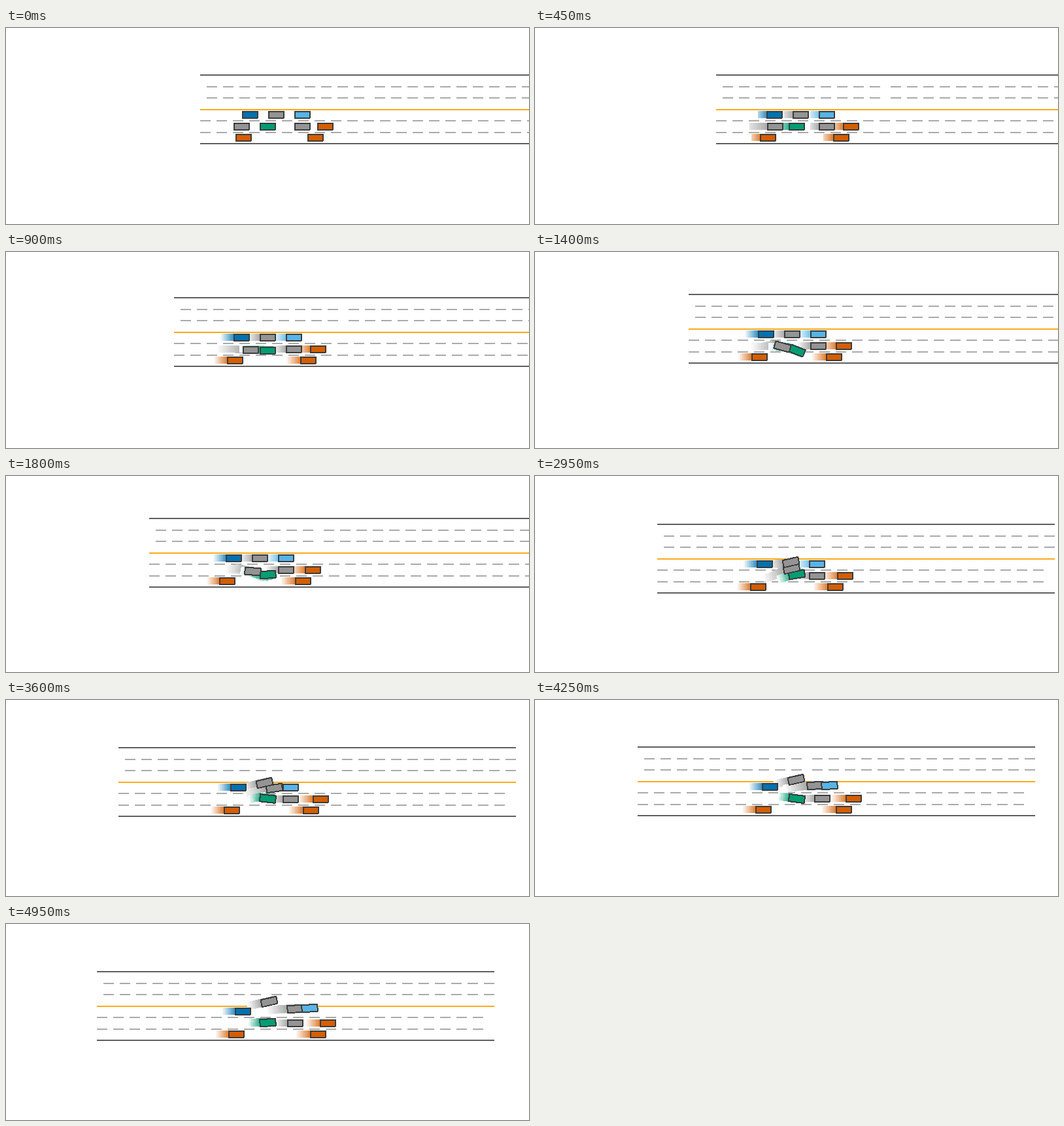
These frames come from a looping animation (800x300 px, 5 s). A matplotlib script:

```python
import numpy as np
import matplotlib.pyplot as plt
from matplotlib.animation import FuncAnimation
from matplotlib.collections import PolyCollection
from matplotlib.colors import to_rgb

W, H, DPI = 800, 300, 100
FRAMES, STEP_MS = 100, 50
EGO_X, EGO_Y = 400.5, 151
ROAD_LEN = 608
TRAIL, TRAIL_STRENGTH = 14, .82

BLUE, SKY, GREEN, ORANGE, GREY = "#0072b2", "#56b4e9", "#009e73", "#d55e00", "#949494"
OUTLINE, EDGE, DASH, MEDIAN = "#3c3c3c", "#5f5f5f", "#aaaaaa", "#fdaa1a"


def curve(*keys):
    """Smooth cubic path through a few (seconds, value) points."""
    times, values = np.array(keys, float).T
    slopes = np.gradient(values, times)

    def at(t):
        t = np.clip(t, times[0], times[-1])
        i = min(np.searchsorted(times, t, side="right"), len(times) - 1)
        span = times[i] - times[i - 1]
        u = (t - times[i - 1]) / span
        ease = u * u * (3 - 2 * u)
        bend = u * (1 - u) * ((1 - u) * slopes[i - 1] - u * slopes[i])
        return values[i - 1] + ease * (values[i] - values[i - 1]) + span * bend
    return at


def cruise(start, speed):
    return lambda t: start + speed * t


def after(t, start):
    return max(0, t - start)


def ramp(t, start, end):
    u = np.clip((t - start) / (end - start), 0, 1)
    return u * u * (3 - 2 * u)


def swerve(t):
    """Heading of the car that is hit: a damped swing around straight ahead."""
    s = t - 1.75
    return -27 * ramp(t, .9, 1.4) * np.exp(-.5 * s) * np.sin(2.05 * s)


# Screen position of the road; the camera follows the green car.
road_x = curve((0, 297), (.9, 257), (1.4, 235), (2.25, 204), (2.95, 187),
               (4.25, 157), (4.95, 139))
road_y = curve((0, 71), (.9, 69), (1.4, 64), (1.6, 63), (2.25, 69), (2.95, 73),
               (4.25, 71), (4.95, 72))

SLOW, FAST = 29.7, 32.7
LANE1, LANE2, LANE3 = (cruise(y, 0) for y in (62, 80, 97))
STRAIGHT = cruise(0, 0)

# colour, x along the road, y across the road, heading in degrees
CARS = [
    (GREEN, lambda t: EGO_X - road_x(t), lambda t: EGO_Y - road_y(t), swerve),
    (GREY,
     curve((0, 63.5), (1.4, 143), (2.25, 174.5), (2.95, 206), (4.25, 271), (4.95, 303)),
     curve((0, 80), (1.4, 81), (2.25, 81.5), (2.95, 69.5), (4.25, 60), (4.95, 57.5)),
     curve((1, 0), (1.4, 15), (2.25, -14), (2.95, -13), (4.25, -3), (4.95, -2))),
    (BLUE, cruise(76.5, SLOW), LANE1, STRAIGHT),
    (GREY, cruise(116.5, SLOW), lambda t: 62 - 6.2 * after(t, 2.5),
     lambda t: -13 * ramp(t, 2.5, 2.9)),
    (SKY, lambda t: 156.5 + SLOW * t + 16.3 * after(t, 3.6),
     lambda t: 62 - 3.4 * after(t, 3.6), lambda t: -3 * ramp(t, 3.6, 3.9)),
    (GREY, cruise(156.5, SLOW), LANE2, STRAIGHT),
    (ORANGE, cruise(191.5, FAST), LANE2, STRAIGHT),
    (ORANGE, cruise(66.5, SLOW), LANE3, STRAIGHT),
    (ORANGE, cruise(176.5, FAST), LANE3, STRAIGHT),
]


def bar(x, y, w, h=2):
    return [(x, y), (x + w, y), (x + w, y + h), (x, y + h)]


def box(cx, cy, w, h, degrees):
    a = np.radians(degrees)
    turn = np.array([[np.cos(a), np.sin(a)], [-np.sin(a), np.cos(a)]])
    corners = np.array([(-1, -1), (1, -1), (1, 1), (-1, 1)]) * (w / 2, h / 2)
    return corners @ turn + (cx, cy)


def fade(color, strength):
    return tuple(1 - strength * (1 - c) for c in to_rgb(color))


def road(x, y):
    shapes = [(bar(x, y + dy, ROAD_LEN), color)
              for dy, color in ((0, EDGE), (53, MEDIAN), (105, EDGE))]
    upper = [*range(10, 250, 25), *range(267, ROAD_LEN, 25)]
    lower = range(0, 600, 25)
    for starts, rows in ((upper, (18, 35)), (lower, (70, 88))):
        shapes += [(bar(x + s, y + dy, 16), DASH) for dy in rows for s in starts]
    return shapes


def place(car, t, ox, oy):
    _, x, y, heading = car
    cx = round(float(x(t) + ox) - .5) + .5
    return cx, round(float(y(t) + oy)), float(heading(t))


def trail(car, frame, ox, oy):
    shapes = []
    for age in range(min(TRAIL, frame), 0, -1):
        cx, cy, angle = place(car, (frame - age) * STEP_MS / 1000, ox, oy)
        color = fade(car[0], TRAIL_STRENGTH * (1 - age / TRAIL))
        shapes.append((box(cx, cy - .5, 25, 11, angle), color))
    return shapes


def body(car, t, ox, oy):
    cx, cy, angle = place(car, t, ox, oy)
    # The outline is one box stamped with a one pixel pen to the right and below.
    shapes = [(box(cx - .5 + dx, cy - .5 + dy, 24, 11, angle), OUTLINE)
              for dx, dy in ((0, 0), (1, 0), (0, 1))]
    return shapes + [(box(cx, cy, 21, 8, angle), car[0])]


fig = plt.figure(figsize=(W / DPI, H / DPI), dpi=DPI, facecolor="white")
ax = fig.add_axes([0, 0, 1, 1])
ax.set_xlim(0, W)
ax.set_ylim(H, 0)
ax.axis("off")
scene = PolyCollection([], edgecolors="none", linewidths=0, antialiaseds=False)
ax.add_collection(scene, autolim=False)


def draw(frame):
    t = frame * STEP_MS / 1000
    ox, oy = round(float(road_x(t))), round(float(road_y(t)))
    shapes = road(ox, oy)
    for car in reversed(CARS):
        shapes += trail(car, frame, ox, oy)
    for car in CARS:
        shapes += body(car, t, ox, oy)
    scene.set_verts([verts for verts, _ in shapes])
    scene.set_facecolor([to_rgb(color) for _, color in shapes])
    return [scene]


anim = FuncAnimation(fig, draw, frames=FRAMES, interval=STEP_MS, repeat=True, repeat_delay=0)
plt.show()
```
